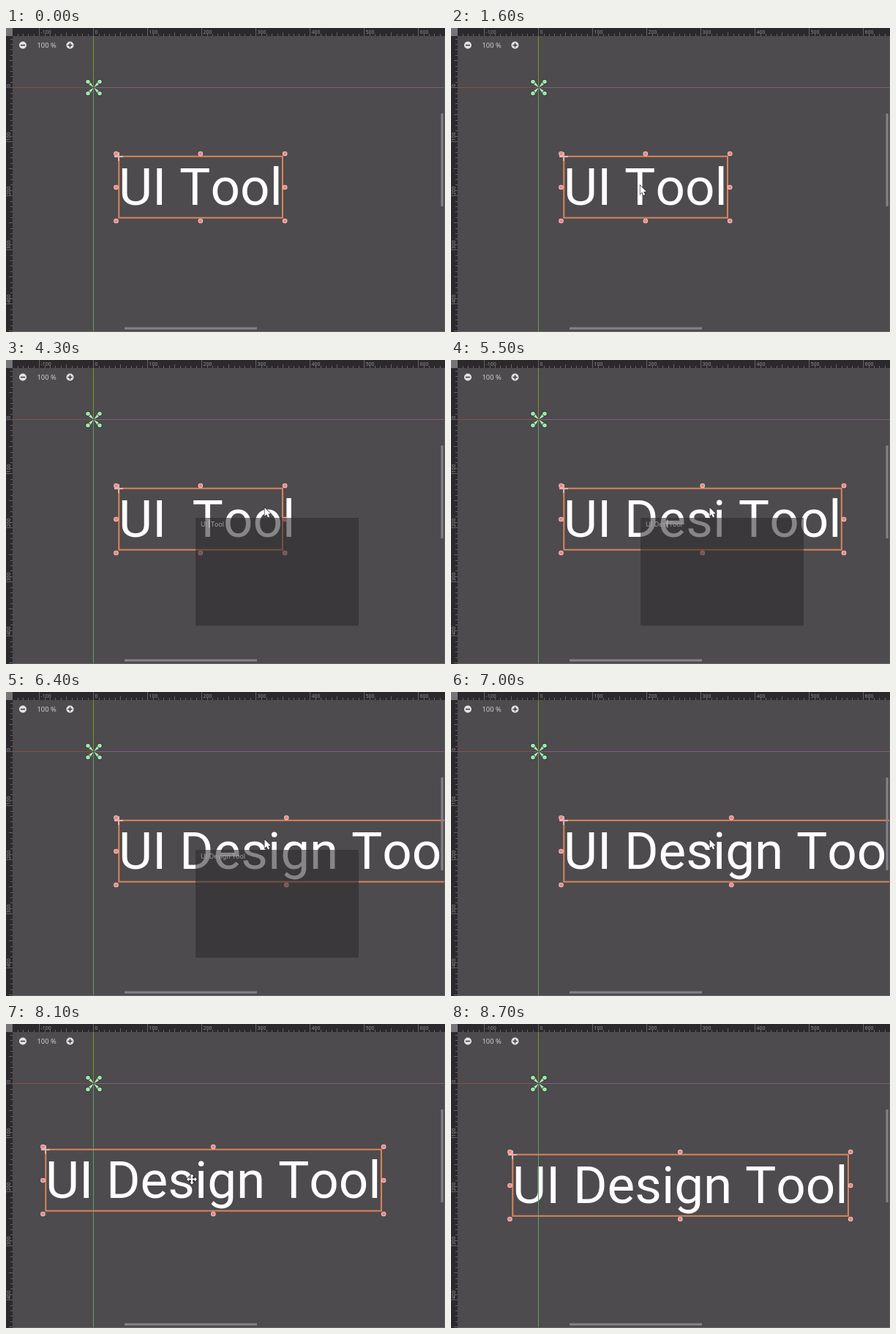
Recreate the animation shown at these times as an HTML page with a canvas. Size 600 by 416 pixels, loop 9.8 s.

```html
<!DOCTYPE html>
<html lang="en">
<head>
<meta charset="utf-8">
<title>Editing a label on a canvas</title>
<style>
  html, body { margin: 0; width: 100%; height: 100%; overflow: hidden; background: #4d4b4d; }
  canvas { display: block; }
</style>
</head>
<body>
<canvas id="stage" width="600" height="416"></canvas>
<script>
const ctx = document.getElementById('stage').getContext('2d');
const LOOP = 9800, STEP = 100;
const ORIGIN = { x: 119.7, y: 81.7 }, UNIT = 74;   // UNIT: 100 canvas units on screen
const UI_FONT = '"Noto Sans", sans-serif';
const LABEL_FONT = '71.04px Roboto, sans-serif';
const INK = '#2b292b';

// Pointer tip or centre: [time, x, y]
const ENTER = [[600, 560, 249], [800, 425, 228], [1000, 250, 205], [1100, 203, 202],
  [1300, 255, 210], [1400, 255, 210], [1600, 258, 215], [2300, 258, 215], [2700, 290, 217],
  [3300, 353, 201.5], [7100, 353, 201.5], [7400, 370, 214.5]];
// Pointer offset while dragging: [time, dx, dy]
const DRAG = [[7500, 0, 0], [7700, -30, -2.5], [7800, -44, -7], [8000, -100, -4],
  [8200, -132, 0], [8300, -112, 2], [8400, -70, 3]];
const TYPED = [[4300, ' '], [4600, 'D'], [4900, 'e'], [5200, 's'], [5400, 'i'], [5600, 'g'], [5700, 'n']];

function along(keys, t) {
  if (t <= keys[0][0]) return keys[0].slice(1);
  const i = keys.findIndex(k => k[0] >= t);
  if (i < 0) return keys[keys.length - 1].slice(1);
  const a = keys[i - 1], b = keys[i], f = (t - a[0]) / (b[0] - a[0]);
  return [a[1] + (b[1] - a[1]) * f, a[2] + (b[2] - a[2]) * f];
}

const typedAt = t => TYPED.filter(k => k[0] <= t).map(k => k[1]).join('');

// The first typed space goes before the caret, the old one stays after it
const labelAt = t => 'UI' + typedAt(t) + ' Tool';

function rect(color, x, y, w, h) {
  ctx.fillStyle = color;
  ctx.fillRect(x, y, w, h);
}

function disc(color, x, y, r) {
  ctx.fillStyle = color;
  ctx.beginPath();
  ctx.arc(x, y, r, 0, 7);
  ctx.fill();
}

function text(str, x, y, font, color) {
  ctx.font = font;
  ctx.fillStyle = color;
  ctx.fillText(str, x, y);
}

function width(str, font) {
  ctx.font = font;
  return ctx.measureText(str).width;
}

function polygon(points, fill, stroke, lineWidth = 1) {
  ctx.beginPath();
  points.forEach(([x, y]) => ctx.lineTo(x, y));
  ctx.closePath();
  if (stroke) {
    ctx.strokeStyle = stroke;
    ctx.lineWidth = lineWidth;
    ctx.stroke();
  }
  ctx.fillStyle = fill;
  ctx.fill();
}

function drawRulers() {
  rect(INK, 0, 0, 600, 11);
  rect(INK, 0, 0, 9, 416);
  const tick = i => i % 10 === 0 ? 11 : i % 5 === 0 ? 5 : 3;
  const font = '7px ' + UI_FONT, color = '#949294';
  for (let i = -15; i < 66; i++) {
    const x = Math.floor(ORIGIN.x + i * UNIT / 10), y = Math.floor(ORIGIN.y + i * UNIT / 10);
    const len = tick(i), side = Math.min(len, 9);
    if (x > 9) rect('#656365', x, 11 - len, 1, len);
    if (y > 11) rect('#656365', 9 - side, y, side, 1);
    if (i % 10) continue;
    text(i * 10, x + 2.5, 8, font, color);
    if (y < 11) continue;
    ctx.save();
    ctx.translate(6, y - 0.5);
    ctx.rotate(-Math.PI / 2);
    text(i * 10, 0, 0, font, color);
    ctx.restore();
  }
  rect('#777577', 0, 0, 9, 11);
}

function drawAxes() {
  rect('#84504f', 9, 81, 111, 1);
  rect('#836082', 120, 81, 480, 1);
  rect('#71962a', 119, 11, 1, 71);
  rect('#639a66', 119, 82, 1, 334);
}

function drawAnchors() {
  for (const sx of [-1, 1]) for (const sy of [-1, 1]) {
    const x = 120 + sx * 8, y = 81.5 + sy * 8;
    polygon([[120, 81.5], [x - sx * 3, y], [x, y - sy * 3]], '#b2efbd', INK, 0.6);
    disc(INK, x, y, 3.4);
    disc('#9ee8ad', x, y, 2.8);
  }
}

function drawZoom() {
  for (const x of [23, 87.5]) {
    disc('#e4e3e4', x, 23.5, 5);
    rect('#3b393b', x - 3, 22.8, 6, 1.5);
  }
  rect('#3b393b', 86.8, 20.5, 1.5, 6);
  text('100 %', 42.5, 27, '9.4px ' + UI_FONT, '#cfcecf');
}

function drawFrame() {
  rect('#858385', 162, 409.5, 181, 3);
  rect('#858385', 594.5, 117, 3, 127);
  rect('#686668', 9, 415, 591, 1);
  rect('#5c5a5c', 599, 11, 1, 405);
}

function drawSelection(x, y, w) {
  const h = 84;
  ctx.strokeStyle = '#d9845c';
  ctx.lineWidth = 2;
  ctx.strokeRect(x + 0.3, y - 0.3, w, h);
  for (const i of [0, 1, 2]) for (const j of [0, 1, 2]) {
    if (i === 1 && j === 1) continue;
    const hx = x - 3.5 + i * (w + 7) / 2, hy = y - 4 + j * (h + 8) / 2;
    disc('#efcdcc', hx, hy, 3.3);
    disc('#f28285', hx, hy, 2.4);
  }
  rect('#dfb3ab', x - 6, y - 1, 12, 2);
  rect('#dfb3ab', x - 1, y - 6, 2, 12);
}

function caretIndex(t) {
  if (t >= TYPED[0][0]) return 2 + typedAt(t).length;
  return Math.max(2, 7 - Math.max(0, Math.floor((t - 3200) / 200)));
}

function drawEditor(t) {
  const font = '8.9px ' + UI_FONT, str = labelAt(t);
  rect('rgba(45, 43, 45, 0.57)', 259, 216, 223, 147.5);
  text(str, 266, 227.5, font, '#a3a1a3');
  if (t < 6400) rect('#d0cfd0', 265.5 + width(str.slice(0, caretIndex(t)), font), 218.5, 1, 11);
}

function drawArrow(x, y) {
  const shape = [[0.5, 0.5], [0.5, 12.2], [3.2, 9.8], [5, 14], [7.2, 13], [5.4, 9], [9, 8.8]];
  polygon(shape.map(([a, b]) => [x + a, y + b]), '#fff', '#222', 1.2);
}

function drawMove(x, y) {
  const arm = [[-1, -1], [-1, -4], [-3, -4], [0, -7], [3, -4], [1, -4]];
  const shape = [0, 1, 2, 3].flatMap(k => arm.map(([a, b]) => {
    for (let i = 0; i < k; i++) [a, b] = [-b, a];
    return [x + a, y + b];
  }));
  polygon(shape, '#fff', '#222', 1.5);
}

function drawPointer(t) {
  if (t < 600 || t >= 8700) return;
  if (t >= 8600) return drawArrow(393, 160);
  const [x, y] = along(ENTER, t), [dx, dy] = along(DRAG, t);
  (t < 7400 ? drawArrow : drawMove)(x + dx, y + dy);
}

function draw(t) {
  // The label trails the pointer, and its frame trails the text, by one step
  const [dx, dy] = along(DRAG, t - STEP);
  const x = 154 + dx, y = 176 + dy;
  ctx.fontKerning = 'none';
  rect('#4d4b4d', 0, 0, 600, 416);
  text(labelAt(t), x, y + 66, LABEL_FONT, '#fff');
  drawAxes();
  drawSelection(x, y, width(labelAt(t - STEP), LABEL_FONT));
  drawAnchors();
  if (t >= 2100 && t < 7000) drawEditor(t);
  drawRulers();
  drawFrame();
  drawZoom();
  drawPointer(t);
}

const start = performance.now();
function tick() {
  const t = (performance.now() - start) % LOOP;
  draw(Math.floor(t / STEP) * STEP);
  requestAnimationFrame(tick);
}
tick();
</script>
</body>
</html>
```
